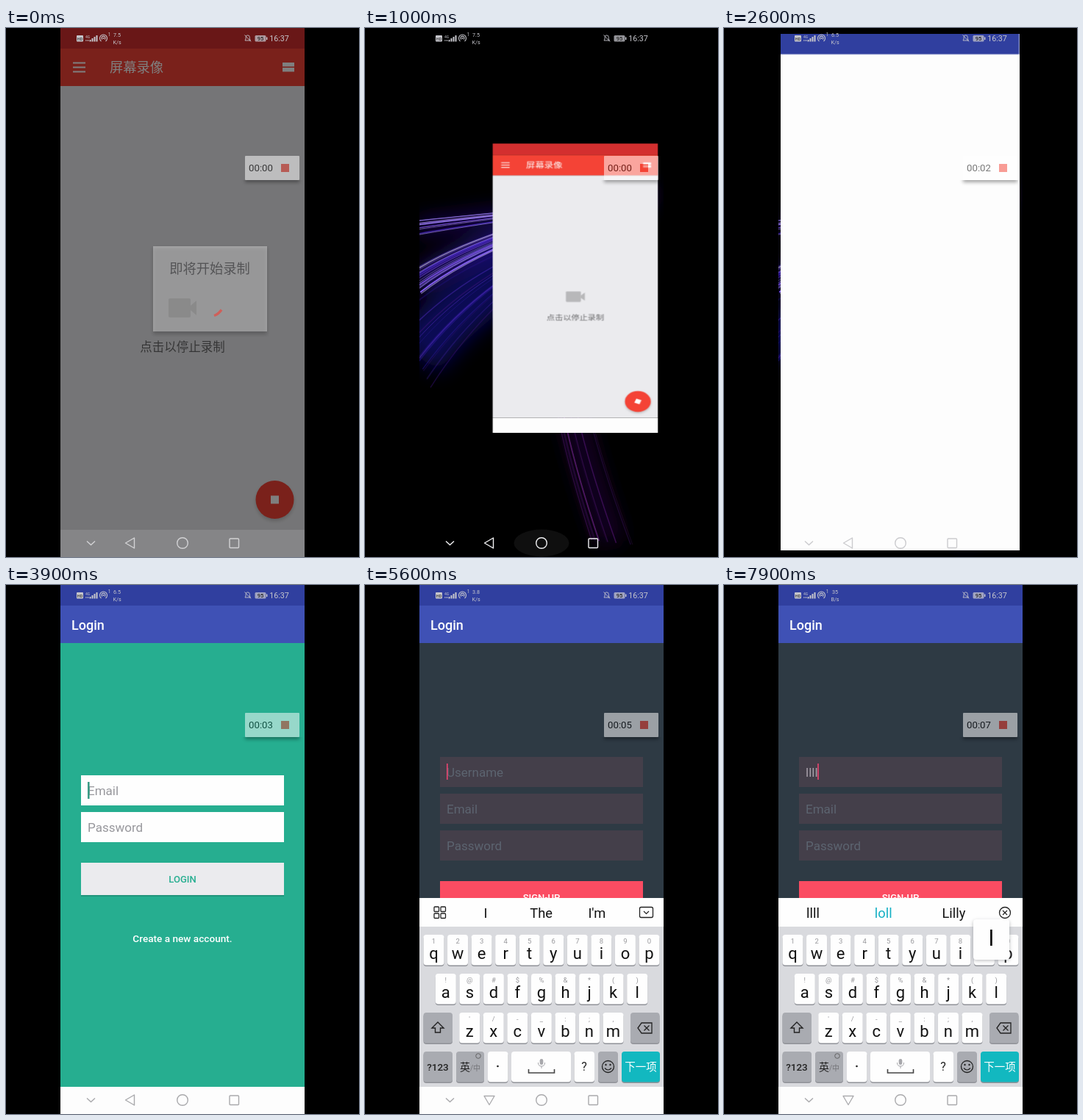
Write an HTML page that moves like this. It is 480 by 720 pixels and loops after 8 s.

```html
<!DOCTYPE html>
<html lang="zh">
<head>
<meta charset="utf-8">
<title>Screen recording</title>
<style>
html, body { margin: 0; width: 100%; height: 100%; overflow: hidden; background: #000; }
svg { display: block; width: 480px; height: 720px; }
text { font-family: Roboto, "Noto Sans CJK SC", "Noto Sans CJK", sans-serif; }
.a { animation: 8s linear infinite; }

#dialog { animation-name: dialog; }
@keyframes dialog { 0% { opacity: 1 } 1.9%, 100% { opacity: 0 } }
#dim { animation-name: dim; }
@keyframes dim { 0%, 1.25% { opacity: 1 } 5%, 100% { opacity: 0 } }

/* recorder window shrinks into its launcher icon */
#recX, #recY { transform-origin: 382.6px 347.1px; }
#recX { animation-name: recX; }
#recY { animation-name: recY; }
@keyframes recX {
  0%, 10.625% { transform: none; opacity: 1 }
  13.6% { opacity: 1 }
  15.625%, 100% { transform: scaleX(.1446); opacity: 0 }
}
@keyframes recY {
  0%, 10.625% { transform: none; animation-timing-function: cubic-bezier(.3,.35,.6,.89) }
  15.625%, 100% { transform: scaleY(.0667) }
}
#stop { transform-origin: 365.5px 642px; animation-name: stop; }
@keyframes stop { 0%, 11.2% { transform: none } 14%, 100% { transform: rotate(45deg) } }

#home { transform-origin: 240px 360px; animation-name: home; }
@keyframes home {
  0%, 13% { opacity: 0; transform: scale(.92); animation-timing-function: ease-out }
  18%, 28.125% { opacity: 1; transform: none }
  31%, 100% { opacity: 0; transform: none }
}
#press { animation-name: press; }
@keyframes press { 0%, 9% { opacity: 0 } 11%, 13.5% { opacity: 1 } 17%, 100% { opacity: 0 } }

/* login window grows out of its icon */
#app { transform-origin: 192.1px 347.1px; animation-name: app; }
@keyframes app {
  0%, 28.125% { transform: scale(.1446, .0667); animation-timing-function: cubic-bezier(.1,.9,.2,1) }
  36.25%, 100% { transform: none }
}
#appFade { animation-name: appFade; }
@keyframes appFade { 0%, 28.125% { opacity: 0 } 29.4%, 100% { opacity: 1 } }
#login { animation-name: login; }
@keyframes login { 0%, 40.6% { opacity: 0 } 43.1%, 100% { opacity: 1 } }
#caret { animation-name: caret; }
@keyframes caret { 0%, 48.2% { opacity: 0 } 48.7%, 100% { opacity: 1 } }

#signup { animation-name: signup; }
@keyframes signup {
  0%, 57% { transform: translateX(340px); animation-timing-function: cubic-bezier(.2,.6,.3,1) }
  60.6%, 100% { transform: none }
}
#kbd { animation-name: kbd; }
@keyframes kbd {
  0%, 62.2% { transform: translateY(260px); animation-timing-function: cubic-bezier(.2,.6,.3,1) }
  66.2%, 100% { transform: none }
}
#back { transform-origin: 169px 701px; animation-name: back; }
@keyframes back { 0%, 62.2% { transform: none } 66.2%, 100% { transform: rotate(-90deg) } }
#nav { animation-name: nav; }
@keyframes nav {
  0% { color: #d2d2d4 } 5%, 10.6% { color: #a9a9ac }
  12%, 29% { color: #f0f0f2 } 31.5%, 40% { color: #cbcbce }
  48%, 100% { color: #a9a9ac }
}
</style>
</head>
<body>
<script>
const rect = (x, y, w, h, fill, more = '') =>
  `<rect x="${x}" y="${y}" width="${w}" height="${h}" fill="${fill}" ${more}/>`;
const disc = (x, y, r, fill, more = '') =>
  `<circle cx="${x}" cy="${y}" r="${r}" fill="${fill}" ${more}/>`;
const text = (x, y, s, size, fill, anchor = 'middle', more = '') =>
  `<text x="${x}" y="${y}" font-size="${size}" fill="${fill}" text-anchor="${anchor}" ${more}>${s}</text>`;
const line = (d, stroke, w = 1.2, more = '') =>
  `<path d="${d}" fill="none" stroke="${stroke}" stroke-width="${w}" ${more}/>`;
const anim = (id, inner) => `<g id="${id}" class="a">${inner}</g>`;
const medium = 'font-weight="500"';

let seed = 7;
const rnd = () => (seed = seed * 16807 % 2147483647) / 2147483647;

const curve = p => `M${p[0]}C${p.slice(1).join(' ')}`;

// a bundle of light trails scattered around one cubic; lean = sideways share of the scatter
function trails(n, pts, spread, colors, alpha, width, lean = .3) {
  let s = '';
  for (let i = 0; i < n; i++) {
    const k = rnd() - .5;
    const p = pts.map(([x, y], j) =>
      [(x + k * spread[j] * lean).toFixed(1), (y + k * spread[j] * (1 - lean)).toFixed(1)]);
    s += line(curve(p), colors[i % colors.length],
      (.4 + rnd() * width).toFixed(2), `opacity="${(alpha * (.4 + rnd() * .6)).toFixed(2)}"`);
  }
  return s;
}

function wallpaper() {
  const hot = ['#a890ff', '#6a3ce0', '#d8ccff', '#4a28c8', '#8a60f0'];
  const violet = ['#2a1894', '#5a30d0', '#3a1478'];
  const plum = ['#4c1468', '#30104e', '#6a2484'];
  const main = [[70, 272], [180, 256], [290, 248], [366, 222]];
  const low = [[70, 347], [150, 290], [260, 260], [388, 225]];
  const deep = [[70, 445], [130, 370], [210, 312], [330, 262]];
  const fall = [[345, 250], [235, 320], [255, 470], [335, 700]];
  const haze = (p, color, w, o) => line(curve(p), color, w, `opacity="${o}"`);
  return `<g filter="url(#haze)">${haze(deep, '#1a10a8', 75, .5)}${haze(low, '#3a1cc8', 26, .6)}
      ${haze(main, '#3418c0', 14, .6)}${haze(fall, '#2a0c4c', 34, .5)}</g>`
    + trails(14, deep, [150, 110, 60, 12], violet, .55, 1.6)
    + trails(18, main, [30, 18, 12, 6], hot, .8, 1.1)
    + trails(26, low, [46, 30, 20, 9], hot, .8, 1.2)
    + trails(8, [[312, 194], [355, 202], [402, 212], [345, 240]], [12, 14, 16, 12], ['#b08ac0', '#c8b0ff', '#6a30c0'], .7, 1)
    + trails(14, fall, [30, 40, 55, 70], plum, .6, 1.3, .9);
}

const droid = '#1a9f82', white = '#fafafa';
const icons = [
  ['ByteQuestion', '#0a9a62', 1], ['APlayer', '#268fe6'], ['石榴检索工具', white], ['PingDove', '#37a6de'],
  ['Norvi Pocket G..', '#e87c20'], ['Mipu 商铺', white], ['Orbot', '#4c4658'], ['Orfox', '#4c4658'],
  ['ZU信箱', '#f7b416', 1], ['远途导航', white, 1], ['Lettora', '#0f6cb8'], ['答屿', '#0f86ee'],
  ['翻译', '#528ae4'], ['Login', droid], ['WeatherAppDe..', droid], ['屏幕录像', '#e0322c'],
  ['MusicPlayer', droid], ['game-animals', droid], ['codeTest', droid], ['LumBox', '#101012'],
  ['Material Comp..', '#2a2a2c'], ['TakeOut', droid], ['Player', droid], ['Kotlin Mvp', white]
];
const tile = (x, y, fill) => rect(x - 23.5, y - 23.5, 47, 47, fill, 'rx="11"');

function home() {
  let s = '';
  icons.forEach(([name, fill, square], i) => {
    const x = 118 + i % 4 * 81.2, y = 66 + Math.floor(i / 4) * 94.1;
    s += (square ? tile(x, y, fill) : disc(x, y, 23.3, fill)) + text(x, y + 40.5, name, 10.6, '#fff');
  });
  for (let i = 0; i < 4; i++) s += disc(223 + i * 11.1, 604, i < 3 ? 1.7 : 2.6, i < 3 ? '#88888c' : '#fff');
  s += tile(118, 645, '#26b450')
    + line('M108 636q1 15 20 19l3-5-7-4-4 3q-5-2-7-8l3-3-3-7z', '#fff', 1.5, 'style="fill:#fff" stroke-linejoin="round"')
    + tile(199, 645, '#1ca8ee') + '<ellipse cx="199" cy="643" rx="13.5" ry="11" fill="#fff"/><path d="M203 652l1 7 5-9z" fill="#fff"/>'
    + disc(281, 645, 23.3, '#dca63a')
    + tile(361.5, 645, '#e6e6ec') + disc(361.5, 645, 17, '#7c7ca4') + disc(361.5, 645, 12, '#3c4090') + disc(361.5, 645, 6.5, '#5a94d8');
  return s;
}

function recorder() {
  const red = '#f44336';
  return rect(74, 0, 332, 28, '#d32f2f') + rect(74, 79, 332, 604, '#ebebee') + rect(74, 28, 332, 51, red)
    + line('M91 47.5h17M91 53.5h17M91 59.5h17', '#fff', 1.8)
    + text(141, 60, '屏幕录像', 18.3, '#fff', 'start', medium)
    + rect(376, 47, 16, 5.5, '#fff') + rect(376, 54, 16, 5.5, '#fff')
    + rect(221, 368, 30, 26, '#b8b8ba', 'rx="2"') + '<path d="M251 378l8-7v20l-8-7z" fill="#b8b8ba"/>'
    + text(240, 439.5, '点击以停止录制', 16.5, '#6a6a6c')
    + disc(365.5, 645, 26, '#000', 'opacity=".18" filter="url(#soft)"') + disc(365.5, 642, 26, red)
    + anim('stop', rect(360, 636.5, 11, 11, '#fff'))
    + rect(74, 683, 332, 37, '#fdfdfd')
    + anim('dim', rect(74, 0, 332, 683, '#000', 'opacity=".5"') + rect(74, 683, 332, 37, '#858587'))
    + anim('dialog', rect(200, 299, 155, 118, '#000', 'opacity=".2" filter="url(#soft)"')
      + rect(200, 297, 155, 116, '#fff', 'opacity=".36"')
      + text(277, 333.5, '即将开始录制', 18.3, '#545456')
      + line('M283 391.5q6-2 10-8', '#d0605a', 3.4));
}

const teal = '#26ae90';
const header = rect(74, 28, 332, 51, '#3f51b5') + text(89, 60.5, 'Login', 18, '#fff', 'start', medium);
const field = (y, label, fill, ink) =>
  rect(102, y, 276, 41, fill) + text(111, y + 27, label, 17, ink, 'start');

const login = header + rect(74, 79, 332, 604, teal)
  + field(259, 'Email', '#fefefe', '#97979c') + field(309, 'Password', '#fefefe', '#97979c')
  + anim('caret', rect(111, 268, 2.6, 23, '#3a9c86'))
  + rect(102, 379, 276, 45, '#000', 'opacity=".15"') + rect(102, 378, 276, 44, '#ebebee')
  + text(240, 405, 'LOGIN', 13, teal, 'middle', medium)
  + text(240, 486, 'Create a new account.', 13.6, '#fff', 'middle', medium);

const slate = '#443f4a', hint = '#5c6470';
const signup = rect(74, 79, 332, 604, '#2e3a44') + header
  + field(234, '<tspan id="user">Username</tspan>', slate, hint)
  + field(284, 'Email', slate, hint) + field(334, 'Password', slate, hint)
  + rect(102, 403, 276, 44, '#fb4c62') + text(240, 430, 'SIGN-UP', 13, '#fff', 'middle', medium)
  + text(240, 511, 'Already a member? Login', 13.6, '#fff', 'middle', medium)
  + rect(111, 243, 1.6, 22, '#ec4470', 'id="caret2"');

const GRAY = '#a9abb1';
const cap = (x, y, w, fill = '#fefefe') =>
  rect(x, y + 1.5, w, 41.5, '#909298', 'rx="4"') + rect(x, y, w, 41.5, fill, 'rx="4"');

function keyRow(letters, hints, x, y) {
  return [...letters].map((c, i) => {
    const cx = x + i * 32.55;
    return cap(cx - 14, y, 28) + text(cx, y + 12, hints[i], 9.5, '#98989c') + text(cx, y + 32.5, c, 22, '#111');
  }).join('');
}

function keyboard() {
  const ink = '#222';
  return rect(74, 426, 332, 39, '#fefefe') + rect(74, 465, 332, 218, '#d9dade')
    + '<g id="words">' + [0, 1, 2].map(() => text(0, 453, '', 18.3, '#111')).join('') + '</g>'
    + `<g id="idle">${[[94, 438], [103, 438], [94, 447], [103, 447]].map(([x, y]) =>
        rect(x, y, 6.5, 6.5, 'none', `stroke="${ink}" stroke-width="1.3" rx="1"`)).join('')}
      ${rect(373.5, 438.5, 18, 14, 'none', `stroke="${ink}" stroke-width="1.3" rx="2"`)}${line('M379 444l3.5 3.5 3.5-3.5', ink)}</g>`
    + `<g id="busy">${disc(382, 446, 7.5, 'none', `stroke="${ink}" stroke-width="1.3"`)}${line('M379 443l6 6M385 443l-6 6', ink)}</g>`
    + keyRow('qwertyuiop', '1234567890', 93.5, 476)
    + keyRow('asdfghjkl', '!@#$%&*()', 109.8, 529).replace('>&<', '>&amp;<')
    + keyRow('zxcvbnm', "'/-_:;,", 142.2, 582)
    + cap(79.5, 582, 39.5, GRAY) + line('M99 595l-8 8h4.5v6h7v-6h4.5z', ink, 1.4)
    + cap(361, 582, 39.5, GRAY) + line('M371 603l5-7h14v14h-14zM379.5 599.5l7 7M386.5 599.5l-7 7', ink, 1.3)
    + cap(79.5, 635, 39.5, GRAY) + text(99, 660.5, '?123', 13.5, ink, 'middle', medium)
    + cap(124, 635, 38, GRAY) + text(136, 661, '英', 14, ink) + text(150, 661, '/中', 10, '#747478')
    + disc(154, 641, 3.3, 'none', 'stroke="#555" stroke-width=".8"')
    + cap(167, 635, 27.5) + disc(180.5, 655, 1.3, ink)
    + cap(199, 635, 81) + line('M222.5 659v5h35v-5', '#444', 1.6)
    + rect(237.7, 645, 4.6, 8, '#a8a8ac', 'rx="2.3"') + line('M235.5 650q0 5 4.5 5t4.5-5M240 655v3', '#a8a8ac', 1)
    + cap(284.5, 635, 27.5) + text(298, 661, '?', 16, ink)
    + cap(317, 635, 27, GRAY) + disc(330.5, 655.5, 8, 'none', `stroke="${ink}" stroke-width="1.3"`)
    + disc(327.5, 653, 1.2, ink) + disc(333.5, 653, 1.2, ink) + line('M326 657.5q4.5 5 9 0', ink)
    + cap(349, 635, 52, '#12b8c0') + text(375, 660.5, '下一项', 14.5, '#fff')
    + `<g id="popup">${rect(339, 457, 49, 54, '#707278', 'rx="4" opacity=".5" filter="url(#soft)"')}
      ${rect(339, 455, 49, 55, '#fefefe', 'rx="4"')}${text(363.5, 491, 'l', 30, '#111')}</g>`;
}

function statusIcons() {
  const c = '#c6c6cc';
  const bars = [0, 1, 2, 3].map(i => rect(113.5 + i * 3, 16 - i * 2, 2, 2.5 + i * 2, c)).join('');
  return rect(96, 10, 9, 8.5, c, 'rx="1"') + text(100.5, 16.6, 'HD', 5.5, '#333', 'middle', medium)
    + text(111, 14, '4G', 5, c) + line('M109 18v-2M111.5 18v-2', c, 1) + bars
    + line('M129.5 18a5 5 0 1 1 6 0M130.8 15.5a2.5 2.5 0 1 1 3.4 0', c, 1.1) + disc(132.5, 14, 1, c)
    + text(140.5, 11, '1', 6.5, c)
    + text(151, 12, '', 7.2, c, 'middle', 'id="speed"') + text(151, 21.5, '', 7.2, c, 'middle', 'id="unit"')
    + line('M325 17h7.5l-1.2-2v-2.5a2.6 2.6 0 0 0-5.2 0v2.5zM324.5 9.5l8.5 9', c, .9)
    + rect(338.5, 10, 15, 8.5, c, 'rx="1.5" opacity=".75"') + rect(354, 12.5, 1.4, 3.5, c)
    + text(346, 17, '95', 7.5, '#2a2a2a', 'middle', medium)
    + text(371.5, 18, '16:37', 10.7, c);
}

const navIcons = '<ellipse id="press" class="a" cx="240" cy="701" rx="37.5" ry="18.5" fill="#fff" fill-opacity=".06"/>'
  + anim('nav', line('M110 698.5l5.5 5 5.5-5', 'currentColor', 1.4)
    + anim('back', line('M162.5 701l12-7v14z', 'currentColor', 1.4, 'stroke-linejoin="round"'))
    + disc(240, 701, 7.3, 'none', 'stroke="currentColor" stroke-width="1.4"')
    + rect(304, 695, 12.5, 12.5, 'none', 'stroke="currentColor" stroke-width="1.4" rx="1"'));

// half-transparent floating timer
const badge = rect(325, 177, 74, 33, '#000', 'opacity=".35" filter="url(#soft)" clip-path="url(#below)"')
  + `<g opacity=".52">${rect(325, 174, 74, 33, '#fff', 'rx="1"')}
    ${text(346.5, 195, '', 13.2, '#000', 'middle', 'id="timer"')}${rect(374, 185, 11, 11, '#f44336')}</g>`;

document.body.innerHTML = `<svg viewBox="0 0 480 720">
<defs>
  <filter id="soft" x="-30%" y="-30%" width="160%" height="160%"><feGaussianBlur stdDeviation="2.5"/></filter>
  <filter id="haze" filterUnits="userSpaceOnUse" x="0" y="0" width="480" height="720"><feGaussianBlur stdDeviation="14"/></filter>
  <clipPath id="screen">${rect(74, 0, 332, 720, '#000')}</clipPath>
  <clipPath id="aboveNav">${rect(74, 0, 332, 683, '#000')}</clipPath>
  <clipPath id="below">${rect(318, 207, 88, 12, '#000')}</clipPath>
</defs>
${rect(0, 0, 480, 720, '#000')}
<g clip-path="url(#screen)">
  ${wallpaper()}
  ${anim('home', home())}
  ${anim('recX', anim('recY', recorder()))}
  ${anim('appFade', anim('app', rect(74, 0, 332, 720, '#fdfdfd') + rect(74, 0, 332, 28, '#303f9f') + anim('login', login)))}
  <g clip-path="url(#aboveNav)">${anim('signup', signup)}${anim('kbd', keyboard())}</g>
  ${navIcons}${statusIcons()}${badge}
</g></svg>`;

const $ = id => document.getElementById(id);
const show = (id, on) => $(id).setAttribute('visibility', on ? 'visible' : 'hidden');
const taps = [6350, 6800, 7250, 7750];
const guesses = [
  ['I', 'The', "I'm"], ['l', 'like', 'love'], ['ll', 'all', 'will'], ['lll', 'ill', 'All'], ['llll', 'loll', 'Lilly']
];
const words = [...$('words').children];
const clock = $('kbd').getAnimations()[0];

function draw() {
  const t = (clock.currentTime || 0) % 8000;
  const n = taps.filter(p => p <= t).length;
  $('timer').textContent = '00:0' + Math.max(0, Math.floor((t - 280) / 1000));
  $('speed').textContent = t < 1400 ? '7.5' : t < 4380 ? '6.5' : t < 7380 ? '3.8' : '35';
  $('unit').textContent = t < 7380 ? 'K/s' : 'B/s';
  $('user').textContent = n ? 'l'.repeat(n) : 'Username';
  $('user').setAttribute('fill', n ? '#a8a0aa' : hint);
  $('caret2').setAttribute('x', 111 + n * 4.05);
  show('caret2', t < 6020 || n);
  show('popup', n && t - taps[n - 1] < 230);
  show('idle', !n);
  show('busy', n);
  words.forEach((w, i) => {
    w.textContent = guesses[n][i];
    w.setAttribute('x', n ? 121 + i * 95.7 : 164 + i * 75.7);
    w.setAttribute('fill', n && i === 1 ? '#14b0c4' : '#111');
  });
  requestAnimationFrame(draw);
}
draw();
</script>
</body>
</html>
```
